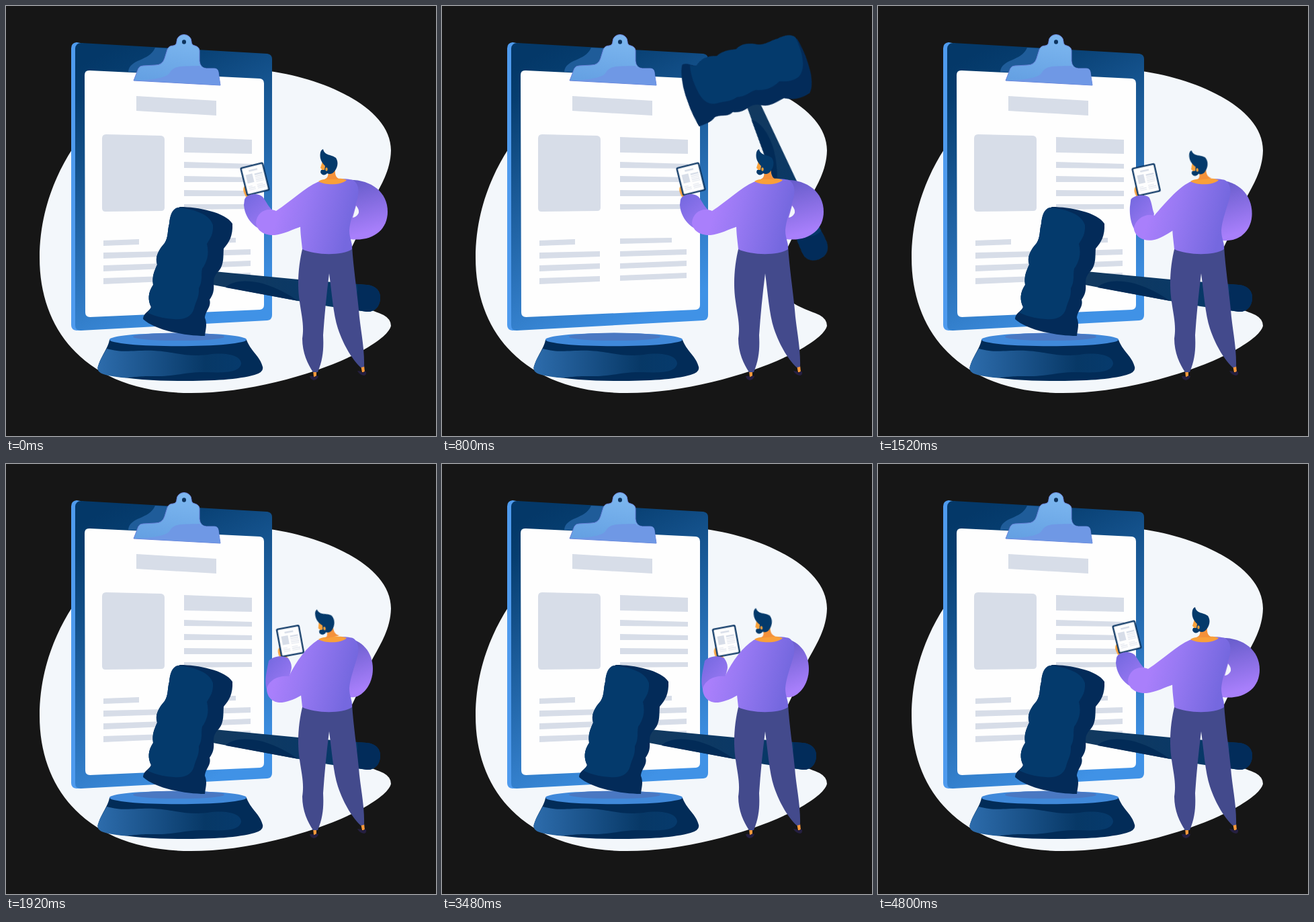
An HTML page that plays this animation: 640 by 640 pixels, repeating every 4840 ms.

```html
<!DOCTYPE html>
<html lang="en">
<head>
<meta charset="utf-8">
<title>Gavel and clipboard</title>
<style>
html, body { margin: 0; width: 100%; height: 100%; overflow: hidden; background: #161616; }
svg { display: block; width: 100%; height: 100%; }

.lift, .gavel, .head, .tablet, .forearm, .sleeve, .elbow, .gap {
  animation: 4840ms linear infinite;
}
.lift { animation-name: lift; }
.gavel { animation-name: swing; transform-origin: 582px 429px; }
.head { animation-name: nod; transform-origin: 484px 258px; }
.tablet { animation-name: tablet; }
.forearm { animation-name: forearm; }
.sleeve { animation-name: sleeve; }
.elbow { animation-name: elbow; }
.gap { animation-name: gap; transform-origin: 520px 307px; }

@keyframes swing {
  0% { transform: rotate(0deg); animation-timing-function: cubic-bezier(.37, 0, .63, 1); }
  15.25% { transform: rotate(60deg); }
  15.7% { transform: rotate(60deg); animation-timing-function: cubic-bezier(.33, 0, .67, .33); }
  23.72%, 100% { transform: rotate(0deg); }
}
@keyframes lift {
  0%, 10.75% { transform: translateY(0); animation-timing-function: cubic-bezier(.37, 0, .63, 1); }
  15.25%, 15.7% { transform: translateY(-38px); animation-timing-function: cubic-bezier(.37, 0, .63, 1); }
  20.5%, 100% { transform: translateY(0); }
}
@keyframes nod {
  0%, 21.5% { transform: rotate(0deg); animation-timing-function: cubic-bezier(.37, 0, .63, 1); }
  39.3%, 48.8% { transform: rotate(-12deg); animation-timing-function: cubic-bezier(.37, 0, .63, 1); }
  71.9%, 89.3% { transform: rotate(-6deg); animation-timing-function: cubic-bezier(.37, 0, .63, 1); }
  99.2%, 100% { transform: rotate(0deg); }
}
@keyframes tablet {
  0%, 21.5%, 99.2%, 100% { transform: translate(370.5px, 257.5px) rotate(-14deg); animation-timing-function: cubic-bezier(.33, 0, .67, .33); }
  30.6%, 89.3% { transform: translate(393.8px, 257.5px) rotate(-13deg); animation-timing-function: cubic-bezier(.33, .67, .67, 1); }
  39.3%, 79.3% { transform: translate(423px, 263.5px) rotate(-10.5deg); animation-timing-function: cubic-bezier(.33, 0, .67, .33); }
}
@keyframes forearm {
  0%, 21.5%, 99.2%, 100% {
    d: path("M355 288C358 280 374 277 382 284C388 292 391 300 398 305L400 335C385 341 356 325 354 296Z");
    animation-timing-function: cubic-bezier(.33, 0, .67, .33);
  }
  30.6%, 89.3% {
    d: path("M373 287C378 280 394 279 400 284C404 292 404 302 408 309L406 340C385 348 371 325 372 297Z");
    animation-timing-function: cubic-bezier(.33, .67, .67, 1);
  }
  39.3%, 79.3% {
    d: path("M391 293C397 286 412 284 420 289C425 296 426 302 424 308L414 346C386 352 384 330 388 308Z");
    animation-timing-function: cubic-bezier(.33, 0, .67, .33);
  }
}
@keyframes sleeve {
  0%, 21.5%, 99.2%, 100% {
    d: path("M464 262C445 270 425 290 402 305C386 299 374 308 372 322C373 335 385 342 400 341C412 340 428 332 440 328L480 328L490 268Z");
    animation-timing-function: cubic-bezier(.33, 0, .67, .33);
  }
  30.6%, 89.3% {
    d: path("M464 262C445 271 425 295 409 311C395 307 382 316 379 330C381 342 393 349 408 347C418 346 430 337 440 331L480 328L490 268Z");
    animation-timing-function: cubic-bezier(.33, .67, .67, 1);
  }
  39.3%, 79.3% {
    d: path("M464 262C447 273 433 292 421 316C408 314 392 320 388 334C388 348 398 356 411 355C422 353 432 349 440 344L480 328L490 268Z");
    animation-timing-function: cubic-bezier(.33, 0, .67, .33);
  }
}
@keyframes elbow {
  0%, 21.5%, 99.2%, 100% {
    d: path("M505 259C540 256 568 275 568 306C568 334 545 351 512 347L500 300Z");
    animation-timing-function: cubic-bezier(.33, 0, .67, .33);
  }
  30.6%, 89.3% {
    d: path("M505 259C537 260 559 280 559 310C559 335 540 353 512 349L500 300Z");
    animation-timing-function: cubic-bezier(.33, .67, .67, 1);
  }
  39.3%, 79.3% {
    d: path("M505 259C530 261 546 280 546 305C546 330 528 350 512 347L500 300Z");
    animation-timing-function: cubic-bezier(.33, 0, .67, .33);
  }
}
@keyframes gap {
  0%, 21.5%, 99.2%, 100% { transform: scale(1); animation-timing-function: cubic-bezier(.33, 0, .67, .33); }
  30.6%, 89.3% { transform: scale(0); }
  39.3%, 79.3% { transform: scale(0); }
}
</style>
</head>
<body>
<svg viewBox="0 0 640 640">
  <defs>
    <linearGradient id="board" x1=".25" y1="0" x2=".6" y2="1">
      <stop offset="0" stop-color="#043868"/>
      <stop offset=".1" stop-color="#063d6f"/>
      <stop offset="1" stop-color="#4092e6"/>
    </linearGradient>
    <linearGradient id="clip" x1=".6" y1="0" x2=".3" y2="1">
      <stop offset="0" stop-color="#7eb8f0"/>
      <stop offset="1" stop-color="#639fe2"/>
    </linearGradient>
    <linearGradient id="block">
      <stop offset="0" stop-color="#2d6cac"/>
      <stop offset=".75" stop-color="#073866"/>
      <stop offset="1" stop-color="#063a6c"/>
    </linearGradient>
    <linearGradient id="grip" gradientUnits="userSpaceOnUse" x1="315" y1="0" x2="540" y2="0">
      <stop offset="0" stop-color="#12395f"/>
      <stop offset="1" stop-color="#04386a"/>
    </linearGradient>
    <linearGradient id="shirt" gradientUnits="userSpaceOnUse" x1="402" y1="316" x2="508" y2="342">
      <stop offset="0" stop-color="#a97ffb"/>
      <stop offset=".35" stop-color="#9879f3"/>
      <stop offset="1" stop-color="#7568df"/>
    </linearGradient>
    <linearGradient id="cuff" x1=".1" y1="0" x2=".8" y2="1">
      <stop offset="0" stop-color="#7468df"/>
      <stop offset="1" stop-color="#a27cf8"/>
    </linearGradient>
    <linearGradient id="back" x1=".3" y1="0" x2=".5" y2="1">
      <stop offset="0" stop-color="#665cca"/>
      <stop offset=".9" stop-color="#a87ffb"/>
    </linearGradient>
  </defs>

  <rect width="640" height="640" fill="#161616"/>
  <path fill="#f3f7fb" d="M385 96C470 106 573 150 573 215C572 258 543 285 532 320C522 350 503 372 502 405C503 443 540 450 562 460Q573 466 573 476C565 510 410 576 275 576C126 576 50 489 50 375C50 305 75 250 98 214L200 120Z"/>

  <!-- clipboard -->
  <path fill="#4f9bee" d="M97 63Q97 55 105 54L116 56V482L105 483Q97 482 97 475Z"/>
  <path fill="url(#board)" d="M103 63Q104 55 112 55L389 71Q396 72 396 79V460Q396 467 389 468L111 483Q103 483 103 475Z"/>
  <path fill="#1f5c99" d="M182 98C184 78 213 83 222 62L262 64L240 101Z"/>
  <path fill="#fefefe" d="M117 103Q117 95 125 96L378 108Q384 109 384 115V445Q384 451 378 452L125 463Q118 463 118 456Z"/>
  <g fill="#d7dde8">
    <path d="M194 134L313 141V163L194 156Z"/>
    <path d="M149 191L231 193Q236 194 236 199V300Q236 305 231 305L148 306Q143 306 143 301V197Q143 191 149 191Z"/>
    <path d="M265 195L366 199V220L265 218Z"/>
    <path d="M265 232L366 235V242L265 241ZM265 253L366 255V262L265 262ZM265 274L366 275V283H265ZM265 295H366V302L265 303Z"/>
    <path d="M145 349L198 347V355L145 357ZM145 367L235 365V373L145 376ZM145 386L235 383V391L145 395ZM145 405L235 402V410L145 414Z"/>
    <path d="M265 346L342 345V352L265 354ZM265 365L364 362V370L265 373ZM265 383L364 379V387L265 391ZM265 401L364 397V405L265 409Z"/>
  </g>
  <path fill="url(#clip)" stroke="#6a83da" stroke-width="1" d="M190 111L197 93Q199 89 204 89L222 88Q233 88 236 78L240 65Q242 59 249 59Q254 58 254 53A11 10.500 0 0 1 276 53Q276 58 281 59Q289 61 288 69V82Q289 92 298 93L310 93Q315 93 316 98L319 118Z"/>
  <path fill="#6f98e5" d="M196 111C225 109 240 106 244 99C250 88 262 90 288 89Q290 93 298 93L310 93Q315 93 316 98L319 118Z"/>
  <ellipse cx="265" cy="53.500" rx="3" ry="3.200" fill="#0d345f"/>

  <!-- sounding block -->
  <path fill="#022c58" d="M154 497C152 509 142 520 137 536Q134 545 150 549C190 556 220 558 260 558C310 558 345 556 370 549Q384 545 382 537C378 521 365 515 358 497Z"/>
  <path fill="url(#block)" d="M150 510C175 517 190 512 220 513C255 515 265 523 300 519C325 515 349 519 350 532C348 546 325 546 300 545C265 544 255 552 215 551C190 551 185 554 172 553C150 550 133 548 137 536C141 524 146 517 150 510Z"/>
  <ellipse cx="256" cy="496.500" rx="102" ry="9.800" fill="#4089da"/>
  <ellipse cx="257" cy="492.300" rx="68" ry="5.800" fill="#4a78c2"/>

  <!-- gavel -->
  <g class="lift"><g class="gavel">
    <path fill="url(#grip)" d="M310 395L435 407L537 415C551 416 558 425 557 436C556 449 547 456 537 455L480 447L435 439L308 415Z"/>
    <path fill="#022b57" d="M327 419C338 407 362 408 382 413C405 420 418 428 435 439Z"/>
    <path fill="#022c5a" d="M488 448C512 446 528 432 522 414L537 415C551 416 558 425 557 436C556 449 547 456 537 455Z"/>
    <path fill="#032b59" d="M259 299C285 299 327 307 337 324C338 342 332 352 324 361C323 372 325 384 317 394C309 402 309 407 309 413C310 424 308 430 303 437C306 448 297 453 296 464C300 474 297 481 296 491C268 491 222 483 204 466C204 457 213 455 216 448C211 438 211 427 219 415C217 402 221 394 225 385C221 373 228 362 236 353C242 344 240 334 243 324C244 311 249 302 259 299Z"/>
    <path fill="#043a6c" d="M255 300C278 302 303 309 308 326C309 339 304 346 299 354C303 370 299 381 292 391C290 399 293 410 287 420C288 434 282 440 280 450C276 464 264 467 250 466C233 465 219 461 210 456Q215 453 216 448C211 438 211 427 219 415C217 402 221 394 225 385C221 373 228 362 236 353C242 344 240 334 243 324C244 311 247 303 255 300Z"/>
  </g></g>

  <!-- man -->
  <path fill="#f9983a" d="M457 542H462V552H458ZM528 535H533L534 545H530Z"/>
  <path fill="#251f40" d="M452 551Q456 550 459 552Q462 549 465 551Q464 556 458 557Q453 556 452 551ZM523 543Q528 543 531 546Q534 542 536 545Q537 549 533 550Q526 549 523 543Z"/>
  <path fill="#434a8c" d="M442 358C435 385 433 415 437 440C440 462 444 475 441 495C441 516 449 533 457 545H464C472 526 473 510 472 490C474 460 477 430 481 398C485 428 487 458 494 480C503 507 517 528 528 538L533 537C534 508 527 480 525 452C522 420 517 390 515 357Z"/>
  <path class="elbow" fill="url(#back)"/>
  <path class="gap" fill="#f3f7fb" d="M521 297Q526 303 525 308Q522 314 516 315Z"/>
  <g class="tablet">
    <path fill="#f9a23c" d="M-17 6C-22 9 -22 16 -18 26H-8L-10 16Z"/>
    <rect x="-17.800" y="-21.800" width="35.600" height="43.600" rx="2.500" fill="#0a3563"/>
    <rect x="-15.500" y="-19.500" width="31" height="39" rx="1" fill="#fefefe"/>
    <path fill="#d7dde8" d="M-6 -15H7V-12.500H-6ZM-12 -9H-2V4H-12ZM1 -8H13V-5.500H1Z"/>
    <path stroke="#d7dde8" stroke-width=".9" d="M1 -3.500H13M1 -1H13M1 1.500H13M1 4H13M-12 9H-6M-12 11.500H-2M-12 14H-2M1 9H10M1 11.500H13M1 14H13"/>
  </g>
  <path class="forearm" fill="url(#cuff)"/>
  <path fill="url(#shirt)" d="M464 262C478 256 505 256 516 259C526 264 526 278 522 290C517 307 512 320 511 334C511 346 516 352 515 362C500 372 460 371 441 362C440 350 438 340 438 324L450 285Z"/>
  <path class="sleeve" fill="url(#shirt)"/>
  <path fill="#f9a03a" d="M465 261C471 256 500 255 507 259C500 267 474 267 465 261Z"/>
  <g class="head">
    <path fill="#f4913a" d="M479 243H490C489 252 492 256 497 258H474C480 256 480 250 479 243Z"/>
    <path fill="#f9a23c" d="M471 231L480 234L481 247L474 249L469 247L470 243L468 241Z"/>
    <path fill="#043a6b" d="M472 213C474 223 485 221 491 226C495 232 494 240 489 246C486 250 482 251 478 249C475 253 469 252 468 247L469 244L474 244L475 238C471 234 466 228 468 218Q469 214 472 213Z"/>
    <ellipse cx="477" cy="243" rx="1.700" ry="2.800" fill="#f9a23c"/>
  </g>
</svg>
</body>
</html>
```
